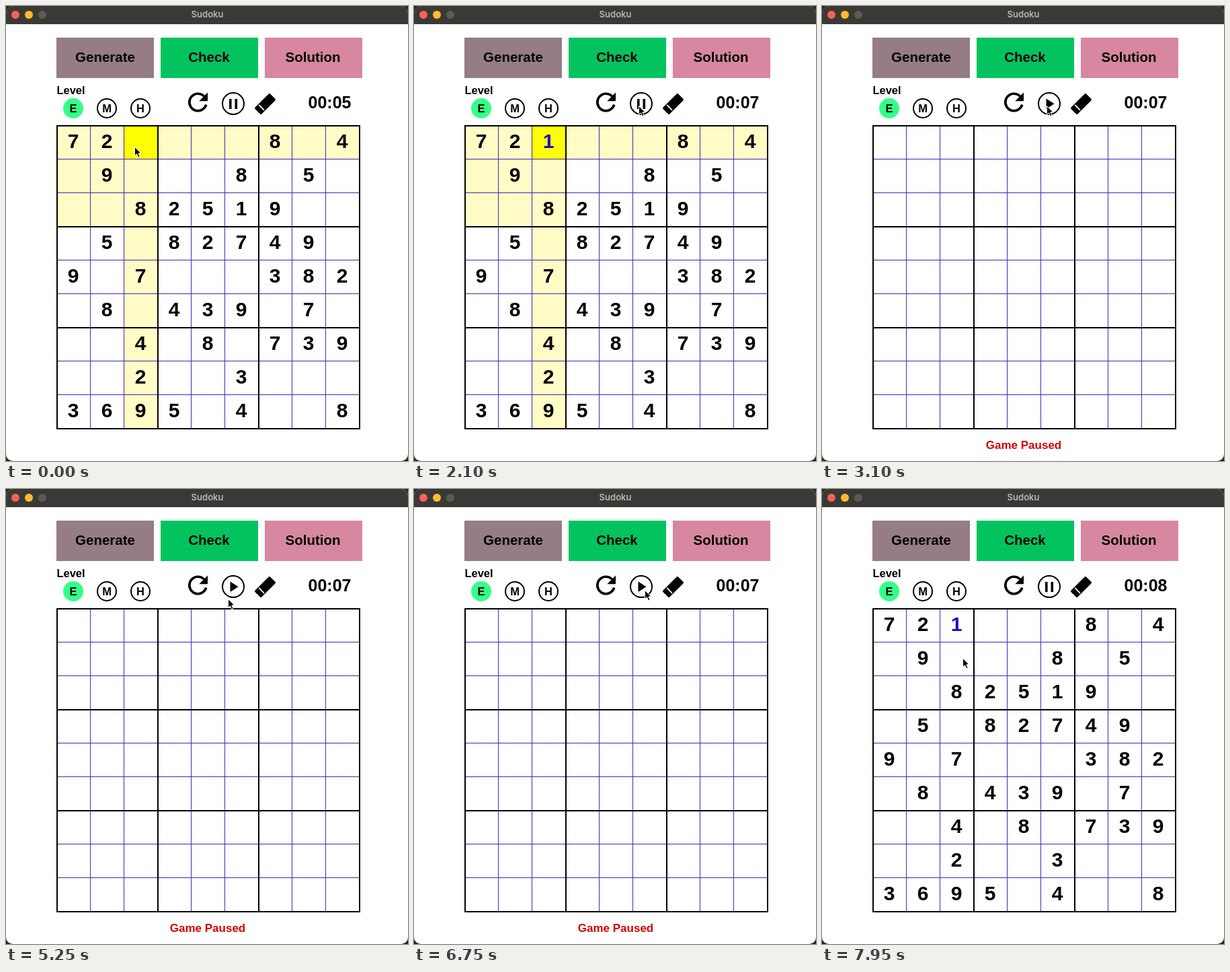
An HTML page with a canvas that plays this animation: 598 px wide and 676 px high, repeating every 8000 ms.

```html
<!DOCTYPE html>
<html lang="en">
<head>
<meta charset="utf-8">
<title>Sudoku</title>
<style>
  html, body { margin: 0; width: 100%; height: 100%; overflow: hidden; background: #2a2724; }
  canvas { display: block; }
</style>
</head>
<body>
<canvas id="stage" width="598" height="676"></canvas>
<script>
const ctx = document.getElementById('stage').getContext('2d');
const LOOP = 8000, STEP = 50;
const TYPED = 700, PAUSED = 2250, RESUMED = 7150;
const TICKS = [650, 1650, 7450];
const LEFT = 76, TOP = 178, CELL = 50;
const BOARD = [
  '72....8.4', '.9...8.5.', '..82519..',
  '.5.82749.', '9.7...382', '.8.439.7.',
  '..4.8.739', '..2..3...', '3695.4..8'
];
// Pointer tip: time, x, y
const POINTER = [
  [0, 191, 209], [950, 191, 209], [1400, 282, 170], [1800, 335, 146], [1950, 334, 147],
  [2100, 334, 148], [5200, 334, 148], [5250, 330, 163], [5350, 330, 163],
  [5600, 300, 330], [5750, 310, 420], [5950, 345, 290], [6150, 341, 152],
  [6250, 343, 150], [7600, 343, 150], [7950, 209, 251], [8000, 209, 251]
];

function text(str, x, y, size, color = '#000', font = '"Liberation Sans", Arial, sans-serif', weight = 'bold') {
  ctx.font = `${weight} ${size}px ${font}`;
  ctx.textAlign = 'center';
  ctx.fillStyle = color;
  ctx.fillText(str, x, y);
}

function rect(x, y, w, h, color) {
  ctx.fillStyle = color;
  ctx.fillRect(x, y, w, h);
}

function disc(x, y, r, color) {
  ctx.beginPath();
  ctx.arc(x, y, r, 0, 7);
  ctx.fillStyle = color;
  ctx.fill();
}

function ring(x, y, r, width, from = 0, to = 2 * Math.PI) {
  ctx.beginPath();
  ctx.arc(x, y, r, from, to);
  ctx.lineWidth = width;
  ctx.strokeStyle = '#000';
  ctx.stroke();
}

function polygon(...points) {
  ctx.beginPath();
  for (let i = 0; i < points.length; i += 2) ctx.lineTo(points[i], points[i + 1]);
  ctx.closePath();
  ctx.fillStyle = '#000';
  ctx.fill();
}

function drawWindow() {
  rect(0, 0, 598, 676, '#2a2724');
  ctx.beginPath();
  ctx.roundRect(0, 0, 598, 676, 10);
  ctx.fillStyle = '#fff';
  ctx.fill();
  ctx.beginPath();
  ctx.roundRect(0, 0, 598, 27, [10, 10, 0, 0]);
  ctx.fillStyle = '#3a3935';
  ctx.fill();
  ['#ff5f57', '#febc2e', '#5c5a57'].forEach((color, i) => disc(14 + 20 * i, 13, 6, color));
  text('Sudoku', 299.5, 17, 13, '#b9b8b6', 'Inter, sans-serif', 600);
}

function drawControls(paused, seconds) {
  [['Generate', '#957c87'], ['Check', '#03c35f'], ['Solution', '#d7879f']].forEach(([label, color], i) => {
    rect(75 + 155 * i, 47, 145, 60, color);
    text(label, 147.5 + 154.5 * i, 83, 20.5);
  });

  text('Level', 96.5, 131, 16.5);
  disc(100, 152, 15, '#33ff88');
  ring(150, 152, 14, 2);
  ring(200, 152, 14, 2);
  [...'EMH'].forEach((level, i) => text(level, 100 + 50 * i, 158, 16.5));

  // Restart
  ring(285.5, 143, 12.7, 3.7, 0.28, 1.75 * Math.PI);
  polygon(287.3, 141.2, 300, 141.2, 300, 128.5);

  // Pause or play
  ring(338, 145, 16, 2);
  if (paused) polygon(333.5, 137.5, 345.5, 145.2, 333.5, 153);
  else [332, 340.5].forEach(x => rect(x, 138, 3.6, 15, '#000'));

  // Eraser
  ctx.save();
  ctx.translate(385.5, 145.5);
  ctx.rotate(-Math.PI / 4);
  ctx.beginPath();
  ctx.roundRect(-16, -7, 32, 14, 2);
  ctx.fillStyle = '#000';
  ctx.fill();
  rect(-8.5, -5.5, 1.8, 11, '#fff');
  ctx.restore();

  text('00:0' + seconds, 481.5, 152, 25);
}

function drawBoard(paused, highlight, typed) {
  if (highlight) {
    const pale = '#fffcc5';
    rect(LEFT, TOP, 9 * CELL, CELL, pale);
    rect(LEFT, TOP, 3 * CELL, 3 * CELL, pale);
    rect(LEFT + 2 * CELL, TOP, CELL, 9 * CELL, pale);
    rect(LEFT + 2 * CELL, TOP, CELL, CELL, '#ff0');
  }
  for (const bold of [false, true]) {
    for (let i = 0; i < 10; i++) {
      if ((i % 3 === 0) !== bold) continue;
      const width = bold ? 2 : 1, color = bold ? '#000' : '#3b2bbb';
      rect(LEFT - 1 + i * CELL, TOP - 1, width, 452, color);
      rect(LEFT - 1, TOP - 1 + i * CELL, 452, width, color);
    }
  }
  if (paused) {
    text('Game Paused', 300, 658, 17, '#d20505');
    return;
  }
  const digit = (d, col, row, color) => text(d, 100 + col * CELL, 211 + row * CELL, 30, color);
  BOARD.forEach((line, row) => [...line].forEach((d, col) => {
    if (d !== '.') digit(d, col, row);
  }));
  if (typed) digit('1', 2, 0, '#1f0bd0');
}

function drawPointer(t) {
  const i = POINTER.findIndex(p => p[0] > t);
  const [t0, x0, y0] = POINTER[i - 1], [t1, x1, y1] = POINTER[i];
  const k = (t - t0) / (t1 - t0);
  ctx.save();
  ctx.translate(x0 + (x1 - x0) * k, y0 + (y1 - y0) * k);
  polygon(0.5, 0.5, 0.5, 13.5, 3.5, 10.8, 5.7, 15.8, 8, 14.8, 5.9, 9.9, 9.8, 9.7);
  ctx.lineWidth = 1;
  ctx.strokeStyle = '#fff';
  ctx.stroke();
  ctx.restore();
}

function frame(now) {
  const t = Math.floor(now % LOOP / STEP) * STEP;
  const paused = t >= PAUSED && t < RESUMED;
  drawWindow();
  drawControls(paused, 5 + TICKS.filter(tick => t >= tick).length);
  drawBoard(paused, t < PAUSED, t >= TYPED);
  drawPointer(t);
  requestAnimationFrame(frame);
}
requestAnimationFrame(frame);
</script>
</body>
</html>
```
